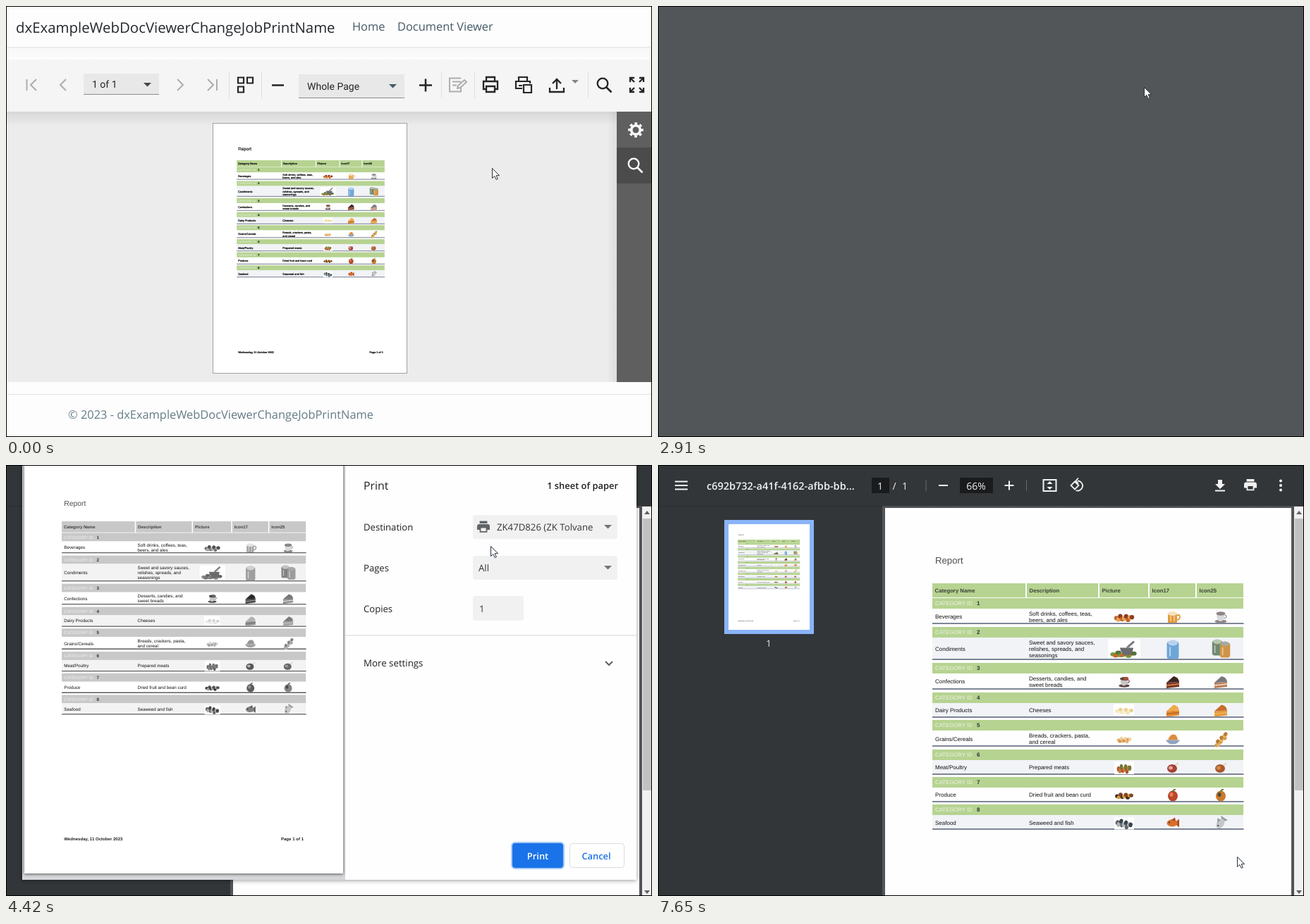
Write an HTML page that moves like this. It is 916 px wide and 612 px high and loops after 8 s.

```html
<!DOCTYPE html>
<html lang="en">
<head>
<meta charset="utf-8">
<title>Print job name</title>
<style>
  html, body { margin: 0; width: 100%; height: 100%; overflow: hidden; background: #fff; }
  #stage { position: relative; width: 100%; height: 100%; overflow: hidden; contain: strict; }
  svg { position: absolute; left: 0; top: 0; width: 916px; height: 612px; }
  text { font-family: "Open Sans", sans-serif; text-rendering: geometricPrecision; white-space: pre; }
  .roboto { font-family: Roboto, sans-serif; }
  .serif { font-family: "Liberation Serif", serif; }
  .sheet text { font-family: "Liberation Sans", sans-serif; stroke: var(--edge, none); stroke-width: .5; }
  .sheet .pale { stroke: none; }
  .mono { filter: grayscale(1); }
  #dialog { transform-origin: 458px 0; }
</style>
</head>
<body>
<div id="stage"></div>
<script>
const LOOP = 8000;

// Markup helpers
const rect = (x, y, w, h, fill, more = '') => `<rect x="${x}" y="${y}" width="${w}" height="${h}" fill="${fill}" ${more}/>`;
const line = (d, color, w = 2, more = '') => `<path d="${d}" fill="none" stroke="${color}" stroke-width="${w}" ${more}/>`;
const fill = (d, color, more = '') => `<path d="${d}" fill="${color}" ${more}/>`;
const oval = (x, y, rx, ry, color, more = '') => `<ellipse cx="${x}" cy="${y}" rx="${rx}" ry="${ry}" fill="${color}" ${more}/>`;
const text = (x, y, s, size, color = '#202124', more = '') => `<text x="${x}" y="${y}" font-size="${size}" fill="${color}" ${more}>${s}</text>`;
const group = (s, more) => `<g ${more}>${s}</g>`;
const at = (x, y, s, scale = 1) => group(s, `transform="translate(${x} ${y}) scale(${scale})"`);
const down = (x, y, color, w = 11) => fill(`M${x} ${y}h${w}l${-w / 2} ${w / 2}z`, color);
const BOLD = 'font-weight="bold" ', SEMI = 'font-weight="600" ', MID = 'text-anchor="middle" ', END = 'text-anchor="end" ';

// Food pictures, each drawn around 0,0
const pile = (w, h, ...colors) => Array.from({ length: 9 }, (_, i) =>
  oval((i / 8 - .5) * w, Math.sin(i * 2.3) * h / 4 + h / 8, w / 7, h / 3.5, colors[i % colors.length])).join('');
const mug = (body, foam) => line('M5-3h3q2 0 2 3t-4 4', body, 1.8) + fill('M-7-5H6V8H-7z', body) +
  line('M-3-2V6M2-2V6', foam, 1.2) + oval(-.5, -5, 7, 3, foam);
const cup = (c, d) => oval(0, 6, 8.5, 2.5, d) + fill('M-6-5H6Q6 5 0 6T-6-5z', c) + oval(0, -5, 6.5, 2.8, d) + line('M6-3q5 2-1 5', d, 1.2);
const jar = (c, lid) => `<rect x="-8.5" y="-11" width="17" height="25" rx="4" fill="${c}"/>` +
  oval(0, -9, 7, 4, lid) + line('M-4-3V10', '#ffffff', 2, 'opacity=".5"');
const slice = (side, top, stripe) => fill('M-9 1L9 0V7L-9 9z', side) + fill('M-9 1L1-8Q8-7 9 0z', top) + line('M-9 5L9 3', stripe, 1.6);
const bowl = (c, food) => fill('M-7 1Q-4-7 1-7T7 1z', food) + fill('M-10 1H10Q7 7 0 7T-10 1z', c);
const leg = (c, d) => line('M0 0L8-7', '#e8ddd0', 3) + oval(-1, 1, 7, 6, c) + oval(-3, 0, 3, 2.5, d);
const fruit = (c, d) => oval(0, 1, 7, 7.5, c) + oval(-2, -1, 2.5, 3, d) + line('M0-5Q1-9 4-8', '#5b6b2a', 1.8);
const fish = (c, d) => fill('M2 0L9-6V6z', d) + oval(-1, 0, 7.5, 5, c) + fill('M-3-4L3-8 4-3z', d) + oval(-5, -1, 1, 1, '#222222');
const wheat = c => group(pile(20, 9, c, '#e2b469', '#b97b32'), 'transform="rotate(-48)"');

const FOODS = [
  ['Beverages', ['Soft drinks, coffees, teas,', 'beers, and ales'], 189, 215.5, 225,
    pile(22, 11, '#c1622b', '#e7a14f', '#8f3d22'), mug('#e39a3d', '#f6e2bd'), cup('#d9d9de', '#8e8587')],
  ['Condiments', ['Sweet and savory sauces,', 'relishes, spreads, and', 'seasonings'], 230, 261, 276,
    rect(-23, -14, 46, 27, '#ffffff') + at(-1, 6, pile(29, 10, '#6f9a3d', '#c7672a', '#55703a')) +
    fill('M-6-2H13Q12 9 4 9T-6-2z', '#686c70') + line('M4-2L14-11', '#777b80', 3),
    jar('#6fa6d8', '#b8d4ec'), at(-5, -3, jar('#708a70', '#b9c7b0'), .85) + at(6, 0, jar('#cf9546', '#a5aaa0'), .85)],
  ['Confections', ['Desserts, candies, and', 'sweet breads'], 281, 307.5, 318,
    at(0, 0, cup('#c9c6c8', '#5c4540') + oval(3, -5, 4, 3, '#a94f40'), .9), slice('#76382a', '#3f2420', '#e58b45'), slice('#b9805c', '#77777c', '#f2e0cf')],
  ['Dairy Products', ['Cheeses'], 323, 348, 358,
    rect(-15, -9, 29, 17, '#ffffff') + pile(20, 9, '#f4e5b4', '#f8f2dc', '#ead28f'), slice('#e28b31', '#efaa4d', '#b96424'), slice('#e59a3e', '#c66e2b', '#f1b65f')],
  ['Grains/Cereals', ['Breads, crackers, pasta,', 'and cereal'], 362, 389, 399,
    pile(16, 9, '#e6b77a', '#d6954e', '#f0cf9b'), bowl('#8fa5bf', '#dd8c3c'), wheat('#d89a45')],
  ['Meat/Poultry', ['Prepared meats'], 404, 429.5, 439,
    rect(-14, -9, 28, 18, '#ffffff') + pile(16, 13, '#a9552b', '#c97a3e', '#6e7b36'), leg('#a34336', '#e8a59a'), leg('#a85a2c', '#d28b4e')],
  ['Produce', ['Dried fruit and bean curd'], 443, 468.5, 478,
    pile(20, 9, '#3f2a22', '#d79a3c', '#7d4527'), fruit('#b9472b', '#e68152'), fruit('#c97a2c', '#4d4a3c')],
  ['Seafood', ['Seaweed and fish'], 482, 508, 517,
    rect(-14, -8, 28, 17, '#ffffff') + group(pile(19, 12, '#5c666c', '#a9b1b4', '#39464c'), 'transform="rotate(14)"'),
    fish('#d8702c', '#b34a1f'), group(fish('#c3c7ca', '#9a9fa3'), 'transform="rotate(-55)"')],
];

const GREEN = '#b6d391', SIZE = 8;
const headers = [['Category Name', 389, 521], ['Description', 523, 624], ['Picture', 626, 695], ['Icon17', 697, 762], ['Icon25', 764, 830]];

const report = text(393, 139.5, 'Report', 13.2, '#505050') +
  headers.map(([name, a, b]) => rect(a, 168, b - a, 20, GREEN) + text(a + 3.6, 180.8, name, 7.75, '#3d4238', BOLD)).join('') +
  FOODS.map(([name, notes, top, mid, base, ...icons], i) =>
    rect(389, top, 441, 15, GREEN) +
    text(393, top + 10.4, 'CATEGORY ID', 7.8, '#f0f5ea', 'class="pale"') + text(452, top + 10.4, i + 1, SIZE, '#333333', BOLD) +
    (i % 2 ? rect(389, top + 15, 441, base - top - 15, '#f1f3f7') : '') +
    line(`M389 ${base}H830.5`, '#535c74', 1.7) +
    text(393, mid + 2.8, name, SIZE, '#111111') +
    notes.map((s, k) => text(526, mid + 2.8 + (k - (notes.length - 1) / 2) * 9, s, SIZE, '#111111')).join('') +
    icons.map((s, k) => at([661, 730, 798][k], mid + .5, s)).join('')).join('') +
  text(393, 745.5, 'Wednesday, 11 October 2023', 7.75, '#222222', BOLD) +
  text(826, 745.5, 'Page 1 of 1', 7.75, '#222222', BOLD + END);

const sheet = (x, y, scale, more = '') => `<use href="#report" transform="translate(${x} ${y}) scale(${scale})" ${more}/>`;
const glass = (x, y, color) => `<circle cx="${x}" cy="${y}" r="7.3" fill="none" stroke="${color}" stroke-width="2.3"/>` +
  line(`M${x + 5} ${y + 5}l7.5 7.5`, color, 2.6);
const printer = (x, y, color) => at(x, y, fill('M17.1 4.5H4.5C3 4.5 1.8 5.7 1.8 7.2v5.4h3.6v3.6h10.8v-3.6h3.6V7.2c0-1.5-1.2-2.7-2.7-2.7zM14.4 14.4H7.2V9.9h7.2zM16.2 0H5.4v3.6h10.8z', color, 'fill-rule="evenodd"'));

function viewer() {
  const ink = '#252525', pale = '#adadad', link = '#465a66', side = '#5f5f5f';
  return `<defs><g id="report" class="sheet">${report}</g>
    <linearGradient id="shade" x2="0" y2="1"><stop stop-opacity=".09"/><stop offset="1" stop-opacity="0"/></linearGradient>
    <linearGradient id="edge"><stop stop-opacity="0"/><stop offset="1" stop-opacity=".06"/></linearGradient></defs>` +
    rect(0, 0, 916, 612, '#fdfdfd') +
    text(14, 37.5, 'dxExampleWebDocViewerChangeJobPrintName', 20.4, '#24292e') +
    text(491, 35, 'Home', 16.4, link) + text(555, 35, 'Document Viewer', 16.4, link) +
    line('M0 58.5H916M0 551.5H916', '#e3e3e3', 1) + rect(0, 59, 916, 17, 'url(#shade)', 'opacity=".3"') +
    rect(0, 76, 916, 74, '#f5f5f5') + rect(0, 150, 916, 384, '#ececec') + rect(0, 150, 866, 20, 'url(#shade)') +
    line('M29.5 104v16M43 104l-8 8 8 8M85 104l-8 8 8 8M243 104l8 8-8 8M286 104l8 8-8 8M299 104v16', pale) +
    line('M316.5 93v38M362.5 93v38M617.5 93v38M664.5 93v38M825.5 93v38', '#e0e0e0', 1) +
    rect(110, 96, 107, 29, '#e8e8e8') + rect(415, 97, 150, 33, '#e8e8e8') + line('M110 125.5H217M415 130.5H565', '#8d8d8d', 1) +
    text(122, 116, '1 of 1', 14, ink, 'class="roboto"') + text(427, 119, 'Whole Page', 14, ink, 'class="roboto"') +
    down(195, 109, '#444') + down(543, 111, '#405a6a') + down(802, 105, '#858585', 10) +
    line('M329 101.5h8v8h-8zM342 101.5h8v8h-8zM329 114.5h8v8h-8z', ink, 2.2) +
    line('M377 112.5h17M586 112.5h18M595 103.5v18', ink, 2.5) +
    line('M645 102.5h-16v19h16v-5M633 107.5h12M633 112.5h6M640 117l1-4 9-8 3 3-9 8z', pale, 2) +
    group(line('M681 106v-5h12v5M681 118h-4v-11h20v11h-4M681 114h12v8h-12z', ink, 2.3), 'id="printIcon"') +
    line('M727 106v-5h12v5M732 117h-9v-10h20v3M734 112h11v11h-11zM727 113h5', ink, 2.2) +
    line('M771 116v6h20v-6M781 118v-14M775 110l6-6 6 6', ink, 2.3) + glass(846, 110, ink) +
    line('M885 108v-6h6M898 102h6v6M904 116v6h-6M891 122h-6v-6M886 103l5 5M903 103l-5 5M886 121l5-5M903 121l-5-5', ink, 2.3) +
    rect(852, 150, 14, 384, 'url(#edge)') + rect(866, 150, 50, 384, side) + rect(866, 201, 50, 51, '#4b4b4b') +
    '<circle cx="893" cy="176" r="6.3" fill="none" stroke="#fff" stroke-width="3.6"/>' +
    '<circle cx="893" cy="176" r="9.3" fill="none" stroke="#fff" stroke-width="3" stroke-dasharray="3.65" stroke-dashoffset="1.83"/>' + glass(890, 224, '#fff') +
    rect(293.5, 166.5, 275, 355, '#fff', 'stroke="#a0a0a0"') + sheet(142.4, 139.2, .4752, 'style="--edge:#111"') +
    text(88, 586, '© 2023 - dxExampleWebDocViewerChangeJobPrintName', 16.4, '#647b86');
}

function pdf() {
  const bar = '#323639', ink = '#f1f1f1';
  const label = (x, s) => text(x, 34.5, s, 14, ink, MID);
  return rect(0, 0, 916, 612, '#525659') + rect(0, 58, 318, 554, bar) + rect(0, 0, 916, 58, bar) +
    rect(0, 57, 916, 4, 'url(#shade)') +
    line('M24 23.5h18M24 29h18M24 34.5h18', ink) +
    text(69, 35, 'c692b732-a41f-4162-afbb-bb...', 14.5, ink, SEMI) +
    rect(303, 18, 25, 22, '#191b1c') + rect(428, 18, 47, 22, '#191b1c') +
    label(315, '1') + label(335, '/') + label(350, '1') + label(451, '66%') +
    line('M380 21v16M522.5 21v16', '#666a6d', 1) +
    line('M398 29h13M491.5 29h13M498 22.5v13', ink) +
    line('M546.5 21h18v16h-18z', ink) + fill('M555.5 23l4 4h-8zM555.5 35l4-4h-8z', ink) +
    line('M591 23.5l5.5 5.5-5.5 5.5-5.5-5.5zM595 22.5a7 7 0 1 1-2.5 13.5M596 18.5l-3.5 4 3.5 4', ink, 1.8) +
    fill('M794 21h6v6h4l-7 7-7-7h4zM790 35.5h14v2h-14z', ink) + printer(829.2, 20, ink) +
    [22.5, 29, 35.5].map(y => oval(883, y, 2, 2, ink)).join('') +
    rect(94, 78, 127, 162, '#8ab4f8') + rect(100, 84, 115, 150, '#fff') + sheet(35.3, 72.4, .2) +
    text(157, 258, '1', 13, ink, MID) +
    rect(322, 61, 576, 551, '#fefefe') + sheet(0, 0, 1) +
    rect(902, 59, 14, 553, '#f1f1f1') + rect(903, 76, 12, 386, '#c1c1c1') + fill('M905 70l4-5 4 5z', '#606060') + fill('M905 604l4 5 4-5z', '#606060');
}

function dialog() {
  const blue = '#1a73e8', field = '#f1f1f1', grey = '#757575';
  const box = (y, w, h = 34) => rect(662, y, w, h, field, 'rx="4"');
  return group(rect(23, 0, 458, 589, '#d6d7da') + rect(481, 0, 413, 589, '#fefefe'), 'style="filter:drop-shadow(0 1px 3px #0006)"') +
    group(rect(26, -3, 452, 583, '#fff', 'style="filter:drop-shadow(0 1px 2px #0009)"') +
      group(sheet(-226.2, -51.9, .7848), 'class="mono"'), 'id="preview"') +
    group(
      text(507, 35, 'Print', 15.8) + text(868, 34, '1 sheet of paper', 12.9, '#202124', SEMI + END) +
      ['Destination', 'Pages', 'Copies'].map((s, i) => text(507, 93 + i * 58, s, 13.1)).join('') + text(507, 286, 'More settings', 13.3) +
      box(71, 205) + box(129, 205) + box(186, 72, 35) +
      printer(666.2, 79.5, '#606468') + text(696, 93, 'ZK47D826 (ZK Tolvane', 13.2, '#33373b') +
      text(670, 151, 'All', 13.2, '#33373b') + text(671, 209, '1', 13.2, '#33373b') +
      down(848, 85, grey) + down(848, 143, grey) +
      line('M481 242H894', '#e2e2e2', 1.5) + line('M850 279l5 5 5-5', '#5f6368') +
      rect(717, 536, 74, 37, blue, 'rx="5" stroke="#a9cbf8" stroke-width="2"') + text(754, 560, 'Print', 12.9, '#fff', SEMI + MID) +
      rect(799.5, 537.5, 77, 34, '#fff', 'rx="4" stroke="#dadce0"') + text(837, 560, 'Cancel', 12.9, blue, SEMI + MID),
      'id="controls"');
}

const layers = {
  viewer: viewer(),
  message: rect(0, 0, 916, 612, '#fefefe') +
    text(457.5, 17, 'Do not close this tab to get the resulting file.', 21.4, '#000', MID + 'class="serif"'),
  blank: rect(0, 0, 916, 612, '#525659'),
  pdf: pdf(),
  dialog: dialog(),
  overlay: fill('M.5.5V14.5L3.8 11.5 6.2 16.5 8.4 15.5 6.1 10.7H10.5z', '#fff', 'id="pointer" stroke="#26303a"') +
    rect(.5, .5, 915, 611, 'none', 'stroke="#000"'),
};
const el = id => document.getElementById(id);
const show = (id, opacity) => { el(id).style.opacity = opacity; };
el('stage').innerHTML = Object.entries(layers).map(([id, s]) => `<svg id="${id}" viewBox="0 0 916 612">${s}</svg>`).join('');

const fade = (t, start, steps) => Math.min(1, Math.max(0, Math.floor((t - start) / 100 + 1.001) / steps));

const track = [
  [0, 689, 230], [400, 689, 230], [700, 694, 205], [1000, 696, 160], [1300, 689, 115],
  [4320, 689, 115], [4420, 687, 115], [5520, 687, 115], [5720, 687, 119], [5820, 687, 119],
  [6120, 708, 180], [6420, 775, 355], [6720, 812, 509], [7020, 821, 556], [LOOP, 821, 556],
];
function pointerAt(t) {
  const shift = t < 1400 ? 0 : 20;
  const q = Math.floor((t - shift) / 100 + .001) * 100 + shift;
  const i = track.findIndex(key => key[0] > q);
  const [t0, x0, y0] = track[i - 1], [t1, x1, y1] = track[i];
  const k = (q - t0) / (t1 - t0);
  return [Math.round(x0 + (x1 - x0) * k), Math.round(y0 + (y1 - y0) * k)];
}

function render(t) {
  const [x, y] = pointerAt(t);
  el('pointer').setAttribute('transform', `translate(${x} ${y})`);
  show('printIcon', y < 124 ? .75 : 1);
  show('message', fade(t, 2010, 2));
  show('blank', fade(t, 2810, 2));
  show('pdf', fade(t, 3010, 2));
  const open = (fade(t, 3130, 4) * (1 - fade(t, 7350, 4))) ** .9;
  show('dialog', open);
  el('dialog').style.transform = open < 1
    ? `perspective(500px) translateY(${-20 * (1 - open)}px) rotateX(${4.2 * (1 - open)}deg)` : 'none';
  show('controls', fade(t, 3630, 3));
  show('preview', fade(t, 4030, 2));
}

const start = performance.now();
function tick() {
  render((performance.now() - start) % LOOP);
  requestAnimationFrame(tick);
}
tick();
</script>
</body>
</html>
```
